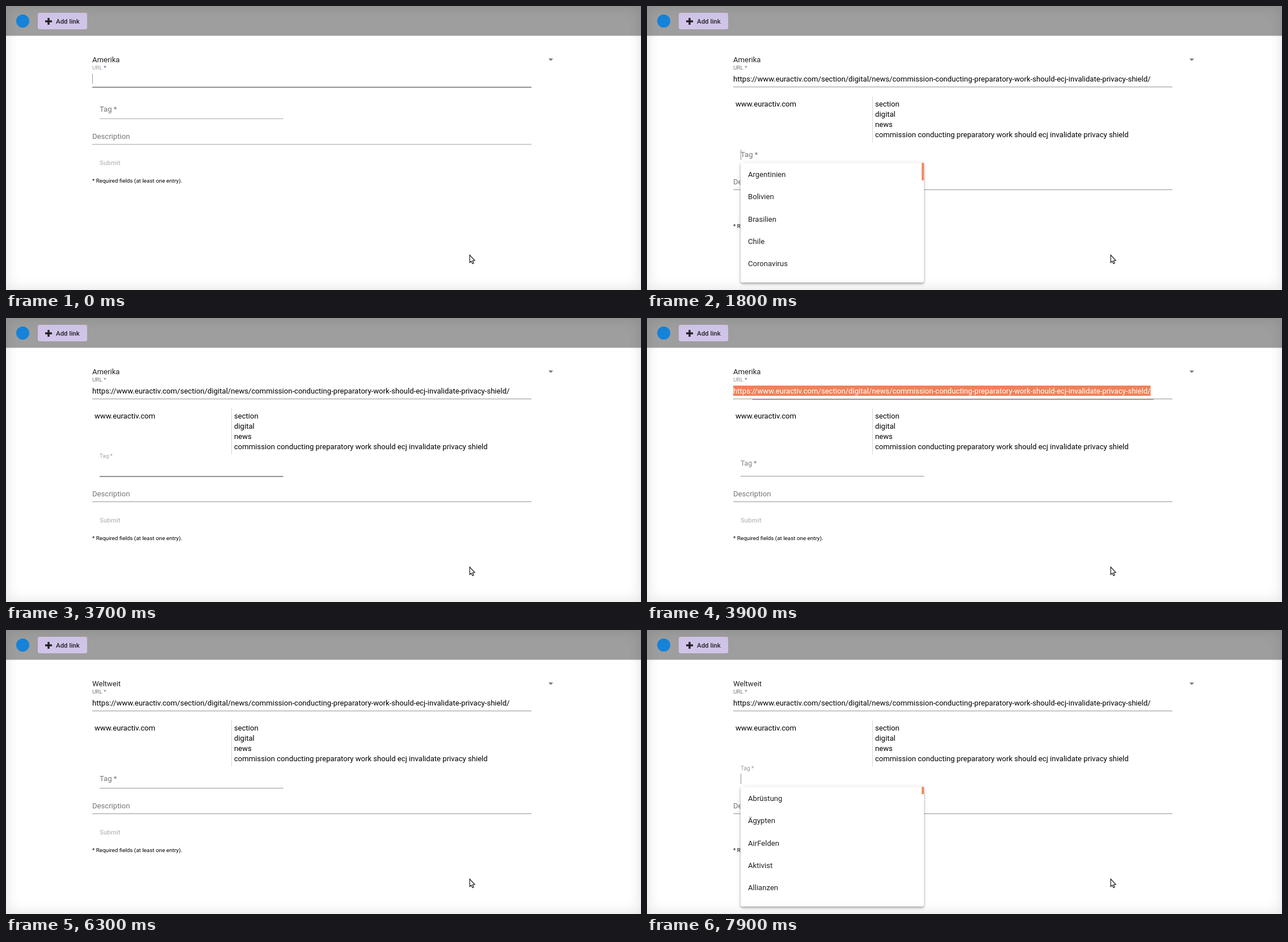
Recreate the animation shown at these times as an HTML page with a canvas. Size 1119 by 500 pixels, loop 8 s.

```html
<!DOCTYPE html>
<html lang="en">
<head>
<meta charset="utf-8">
<title>Add link form</title>
<style>
  html, body { margin: 0; width: 100%; height: 100%; overflow: hidden; background: #fff; }
  canvas { display: block; width: 1119px; height: 500px; }
</style>
</head>
<body>
<canvas id="stage" width="1119" height="500"></canvas>
<script>
const LOOP = 8000;
const W = 1119, H = 500;
const ctx = document.getElementById('stage').getContext('2d');

// Interface sizes are Material Design values at this zoom.
const ZOOM = 0.82;
const BODY = 16 * ZOOM, BUTTON = 14 * ZOOM, SMALL = 12 * ZOOM;
const PRIMARY = '#9e9e9e', HINT = '#757575', INK = '#212121', ORANGE = '#f08159';

const LINK = 'https://www.euractiv.com/section/digital/news/' +
  'commission-conducting-preparatory-work-should-ecj-invalidate-privacy-shield/';
const [HOST, ...PATH] = LINK.replace('https://', '').split('/').filter(Boolean);
const COUNTRIES = ['Argentinien', 'Bolivien', 'Brasilien', 'Chile', 'Coronavirus'];
const TOPICS = ['Abrüstung', 'Ägypten', 'AirFelden', 'Aktivist', 'Allianzen'];

const clamp = v => Math.min(1, Math.max(0, v));
const mix = (a, b, p) => a + (b - a) * p;
const within = (t, from, to) => t >= from && t < to;

// cubic-bezier(.25, .8, .25, 1)
function ease(x) {
  if (x <= 0 || x >= 1) return clamp(x);
  let lo = 0, hi = 1;
  for (let i = 0; i < 24; i++) {
    const s = (lo + hi) / 2;
    if (0.75 * s * (1 - s) + s ** 3 < x) lo = s; else hi = s;
  }
  const s = lo, r = 1 - s;
  return 2.4 * s * r * r + 3 * s * s * r + s ** 3;
}

function blend(from, to, p) {
  const part = (hex, i) => parseInt(hex.slice(i, i + 2), 16);
  return `rgb(${[1, 3, 5].map(i => Math.round(mix(part(from, i), part(to, i), p)))})`;
}

function rect(x, y, w, h, color) {
  ctx.fillStyle = color;
  ctx.fillRect(x, y, w, h);
}

function text(str, x, y, size = BODY, color = '#000', weight = 400) {
  ctx.font = `${weight} ${size}px Roboto, sans-serif`;
  ctx.fillStyle = color;
  ctx.fillText(str, x, y);
  return ctx.measureText(str).width;
}

function polygon(points, fill, stroke) {
  ctx.beginPath();
  points.forEach(([x, y]) => ctx.lineTo(x, y));
  ctx.closePath();
  if (fill) { ctx.fillStyle = fill; ctx.fill(); }
  if (stroke) { ctx.strokeStyle = stroke; ctx.lineWidth = 1.2; ctx.stroke(); }
}

function roundRect(x, y, w, h, r, color) {
  ctx.beginPath();
  ctx.roundRect(x, y, w, h, r);
  ctx.fillStyle = color;
  ctx.fill();
}

// age: ms since the field took focus, or negative when it has none
function underline(x, y, w, age = -1, color = '#949494') {
  rect(x, y, w, 1, color);
  if (age < 0) return;
  const span = w * mix(0.5, 1, ease(age / 300));
  ctx.globalAlpha = clamp(age / 100);
  rect(x + (w - span) / 2, y, span, 2, '#929292');
  ctx.globalAlpha = 1;
}

function drawHeader() {
  rect(0, 0, W, 52, PRIMARY);
  rect(0, 52, W, 1, '#d8d8d8');
  ctx.beginPath();
  ctx.arc(29.5, 26.5, 11.5, 0, 7);
  ctx.fillStyle = '#1583d8';
  ctx.fill();
  roundRect(56, 12, 87, 29, 3.3, '#d1c4e9');
  rect(69, 25.3, 12, 3.4, INK);
  rect(73.3, 21, 3.4, 12, INK);
  text('Add link', 88, 31, BUTTON, INK, 500);
}

function drawUrl(t, filled) {
  const start = t < 1800 ? -1000 : t < 4300 ? 3800 : 6900;
  const focused = t < 1800 || within(t, 3800, 4300) || within(t, 6900, 7700);
  const age = focused ? t - start : -1;
  const tint = focused ? ease(age / 400) : 0;

  const labelWidth = text('URL ', 152, 112, SMALL, blend(HINT, PRIMARY, tint));
  text('*', 152 + labelWidth, 112, SMALL, blend(HINT, '#3f51b5', tint));
  underline(152, 142, 774, age);

  if (!filled) {
    rect(152, 119, 1, 18, PRIMARY);
    return;
  }
  const selected = focused && t >= 3800;
  ctx.font = `400 ${BODY}px Roboto, sans-serif`;
  const width = ctx.measureText(LINK).width;
  if (selected) rect(152, 119, width, 18, ORANGE);
  text(LINK, 152, 133, BODY, selected ? '#fff' : '#000');
  if (within(t, 400, 1600)) rect(887, 119, 1, 18, PRIMARY);
}

function drawPreview() {
  text(HOST, 156, 177);
  rect(397, 159, 1, 81, '#d4d4d4');
  PATH.forEach((part, i) => text(part.replaceAll('-', ' '), 402, 177 + 18 * i));
}

function drawTag(t, shift) {
  const focusedAt = t < 7700 ? 1800 : 7700;
  const focused = within(t, 1800, 3800) || t >= 7700;
  let float = 0;
  if (focused) float = ease((t - focusedAt) / 400);
  else if (within(t, 3800, 4300)) float = 1 - ease((t - 3800) / 400);

  const baseline = mix(186, 166, float) + shift;
  ctx.save();
  ctx.beginPath();
  ctx.rect(160, baseline - 15, 60, 15 + mix(4, 1.8, float));
  ctx.clip();
  text('Tag *', 165, baseline, mix(BODY, SMALL, float), blend(HINT, PRIMARY, float));
  ctx.restore();

  underline(165, 198 + shift, 323.5, focused ? t - focusedAt : -1, shift ? '#949494' : '#a8a8a8');
  if (within(t, 1800, 3000) || t >= 7700) rect(165, 173 + shift, 1, 18, '#8c8c8c');
}

function drawMenu(items, thumb) {
  ctx.save();
  for (const [dy, blur, alpha] of [[2, 3, 0.18], [3.3, 4, 0.14], [0.8, 8, 0.12]]) {
    ctx.shadowColor = `rgba(0,0,0,${alpha})`;
    ctx.shadowBlur = blur;
    ctx.shadowOffsetY = dy;
    roundRect(165, 276.5, 323, 210, [0, 0, 3.3, 3.3], '#fff');
  }
  ctx.restore();
  items.forEach((item, i) => text(item, 178, 301 + 48 * ZOOM * i, BODY, INK));
  rect(484, 276, 4, thumb, '#f58b66');
}

function drawForm(t) {
  const filled = t >= 200;
  const shift = filled ? 80 : 0;
  text(t < 6300 ? 'Amerika' : 'Weltweit', 152, 99, BODY, INK);
  polygon([[955.9, 92.5], [964.1, 92.5], [960, 96.7]], HINT);
  drawUrl(t, filled);
  if (filled) drawPreview();
  drawTag(t, shift);
  text('Description', 152, 234 + shift, BODY, HINT);
  underline(152, 243 + shift, 774, -1, filled ? '#949494' : '#a8a8a8');
  text('Submit', 165, 280 + shift, BUTTON, '#bdbdbd', 500);
  text('* Required fields (at least one entry).', 152, 311 + shift, SMALL);
  if (within(t, 1800, 3700)) drawMenu(COUNTRIES, 31);
  if (t >= 7700) drawMenu(TOPICS, 13);
}

// Soft inset shadow: the blurred edge of a frame around the stage
function drawVignette() {
  ctx.save();
  ctx.shadowColor = 'rgba(0,0,0,0.12)';
  ctx.shadowBlur = 25;
  ctx.beginPath();
  ctx.rect(-60, -60, W + 120, H + 120);
  ctx.rect(0, 0, W, H);
  ctx.fill('evenodd');
  ctx.restore();
}

function drawPointer() {
  polygon([[817.2, 438.4], [817.2, 451.6], [820, 449.2], [822, 453.8],
    [824.2, 452.8], [822.2, 448.4], [826, 448.1]], '#fff', '#1a1a1a');
}

function frame() {
  const t = performance.now() % LOOP;
  rect(0, 0, W, H, '#fff');
  drawHeader();
  drawForm(t);
  drawVignette();
  drawPointer();
  requestAnimationFrame(frame);
}
frame();
</script>
</body>
</html>
```
